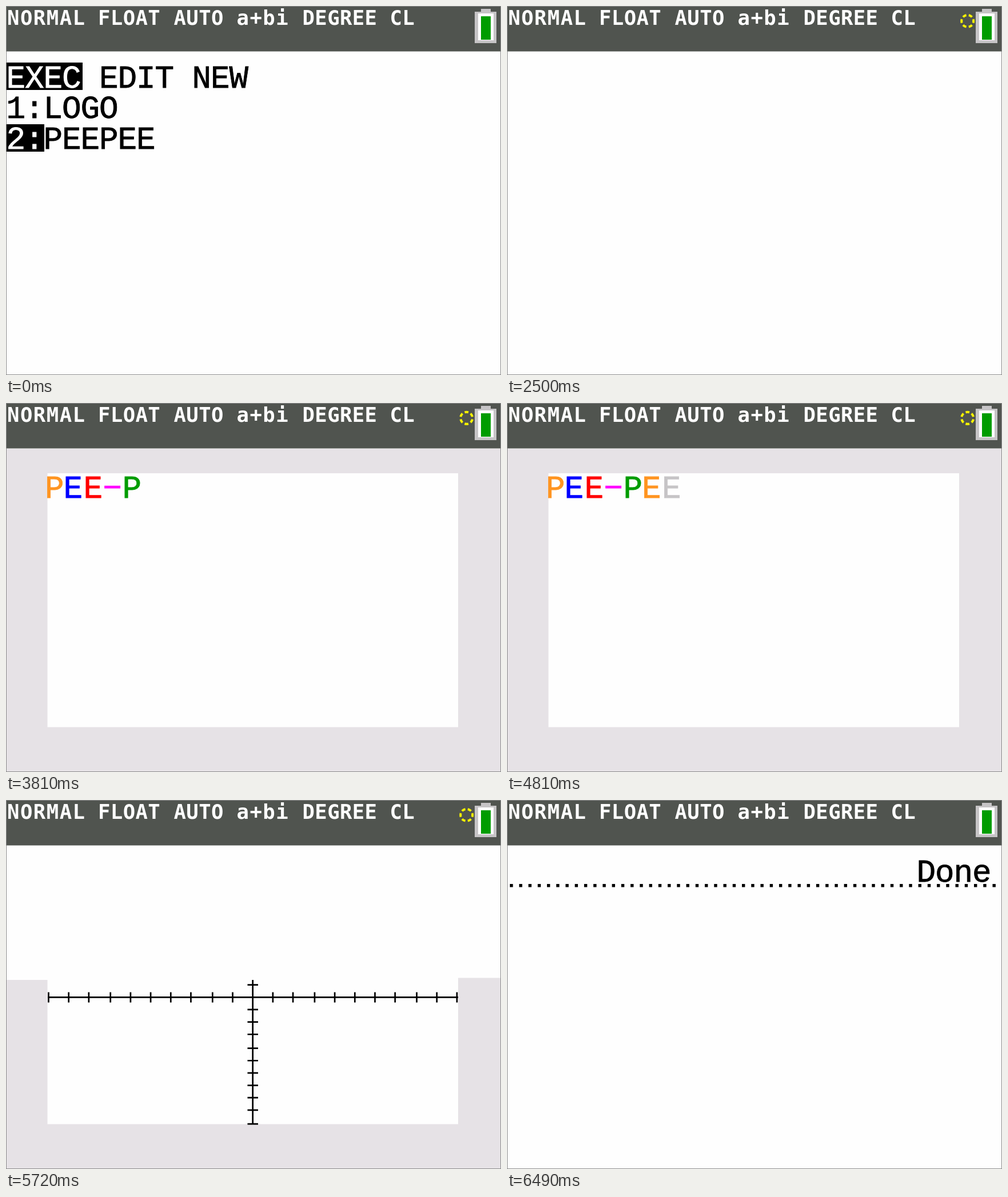
Write an HTML page that moves like this. It is 866 by 646 pixels and loops after 7.01 s.

```html
<!DOCTYPE html>
<html lang="en">
<head>
<meta charset="utf-8">
<title>Calculator program run</title>
<style>
  html, body { margin: 0; width: 100%; height: 100%; overflow: hidden; background: #fefefe; }
  svg { display: block; width: 866px; height: 646px; }
  .status { font: bold 35.6px "DejaVu Sans Mono", monospace; letter-spacing: .4px; fill: #fff; }
  .status .wide { letter-spacing: 1.5px; }
  .big { font: 56px "Liberation Mono", monospace; letter-spacing: -1.13px; }
  .big text { fill: currentColor; stroke: currentColor; stroke-width: .8; }
  .big .token { font: bold 39px "DejaVu Sans", sans-serif; stroke-width: 0; }
  .big .heavy { font-size: 53px; stroke-width: 2; }
  .inv { color: #fefefe; }
  .panel { fill: #e6e2e6; }
  .clear { fill: #fefefe; }
  .axis { fill: none; stroke: #000; stroke-width: 2.7; }
  [data-on] { visibility: hidden; }
</style>
</head>
<body>
<svg viewBox="0 0 866 646">
  <defs>
    <clipPath id="topBar"><rect x="130" y="120" width="45" height="15"/></clipPath>
  </defs>
  <rect class="clear" width="866" height="646"/>

  <!-- program menu -->
  <g class="big" data-on="0 620">
    <rect y="99" width="134" height="48"/>
    <rect y="207" width="67" height="48"/>
    <text class="inv" x=".5" y="142.5">EXEC</text>
    <text x="163" y="142.5">EDIT</text>
    <text x="325.5" y="142.5">NEW</text>
    <text x=".5" y="196">1:LOGO</text>
    <text class="inv" x=".5" y="250">2:</text>
    <text x="65.5" y="250">PEEPEE</text>
  </g>

  <!-- home screen command -->
  <g class="big" data-on="770 2500">
    <text class="token" x="2" y="135">p</text>
    <text class="heavy" x="34" y="142">r</text>
    <text class="token" x="68.5" y="135">g</text>
    <text class="heavy" x="102" y="142">m</text>
    <text x="130.5" y="142.5">PEEPEE</text>
  </g>
  <rect x="328" y="103" width="30" height="41" data-on="770 1230"/>
  <rect x="328" y="103" width="30" height="41" data-on="1880 2500"/>

  <!-- graph screen -->
  <g data-on="2840 5870">
    <path class="panel" d="M0 80H72.5V567.5H791V80H866V646H0Z"/>
  </g>
  <path class="clear" d="M72.5 635H500V632H791V646H72.5Z" data-on="2840 2930"/>
  <rect class="panel" x="72" y="80" width="720" height="43" data-on="3060 5720"/>
  <g id="letters" class="big"></g>
  <g class="axis">
    <path id="vertical" data-on="5450 5870"/>
    <path id="left" data-on="5540 5870"/>
    <path id="right" data-on="5720 5870"/>
  </g>
  <path class="clear" d="M0 80H866V311.5H520V315H0Z" data-on="5720 5870"/>

  <!-- result -->
  <g data-on="5990 7010">
    <g class="big"><text x="716.5" y="142.5">Done</text></g>
    <path d="M5 149.8H859" stroke="#000" stroke-width="5.4" stroke-dasharray="5.4 10.84"/>
  </g>
  <rect x="4" y="157" width="29" height="40" data-on="5990 6490"/>

  <!-- status bar -->
  <rect width="866" height="79.5" fill="#50544f"/>
  <g class="status">
    <text class="wide" x="2" y="33">NORMAL</text>
    <text x="161" y="33">FLOAT</text>
    <text x="293.5" y="33">AUTO</text>
    <text class="wide" x="403.5" y="33">a+bi</text>
    <text x="518.5" y="33">DEGREE</text>
    <text x="671.5" y="33">CL</text>
  </g>
  <g id="busy">
    <circle id="ring" cx="805.7" cy="26.3" r="10.5" fill="none" stroke="#f8f400" stroke-width="4"
      pathLength="60" stroke-dasharray="6 4" stroke-dashoffset="3"/>
  </g>
  <path d="M831 5H848V10H858V65H820V10H831Z" fill="#c6c4c6"/>
  <rect x="826" y="13" width="27" height="47" fill="#fff"/>
  <rect x="831" y="18" width="17" height="41" fill="#009c00"/>
  <rect x=".5" y=".5" width="865" height="645" fill="none" stroke="#8c8c8c"/>
</svg>
<script>
  const LOOP = 7010, PX = 866 / 320;
  const $ = id => document.getElementById(id);

  // [character, x, start, end, colour, clip]
  const letters = [
    ["P", 68, 3060, 5450, "#ff9420"],
    ["E", 100.5, 3230, 5450, "#0000ff"],
    ["E", 135.5, 3390, 3570, "#ff0000", "url(#topBar)"],
    ["E", 135.5, 3570, 5450, "#ff0000"],
    ["\u2212", 169.5, 3720, 5450, "#ff00ff"],
    ["P", 203.5, 3810, 5450, "#009c00"],
    ["E", 236, 3990, 5450, "#ff9420"],
    ["E", 271, 4170, 5450, "#c6c4c6"]
  ];
  for (const [char, x, start, end, color, clip] of letters) {
    const el = document.createElementNS("http://www.w3.org/2000/svg", "text");
    el.textContent = char;
    el.setAttribute("x", x);
    el.setAttribute("y", 166);
    el.style.color = color;
    if (clip) el.setAttribute("clip-path", clip);
    el.dataset.on = start + " " + end;
    $("letters").append(el);
  }

  // Axes with ticks snapped to the calculator's pixels.
  const cx = 431.7, cy = 345.3;
  const snap = v => Math.round(v) * PX;
  let left = `M73 ${cy}H${cx}`, right = `M${cx} ${cy}H791`, vertical = `M${cx} 123V567`;
  for (let k = 1; k <= 10; k++) {
    const dx = snap(13.2 * k), dy = snap(8.15 * k);
    left += `M${cx - dx} 336.5v18`;
    right += `M${cx + dx} 336.5v18`;
    vertical += `M422.5 ${cy - dy}h18.5M422.5 ${cy + dy}h18.5`;
  }
  $("left").setAttribute("d", left);
  $("right").setAttribute("d", right);
  $("vertical").setAttribute("d", vertical);

  const parts = [...document.querySelectorAll("[data-on]")].map(el => {
    const [start, end] = el.dataset.on.split(" ").map(Number);
    return { el, start, end };
  });

  // The ring turns a quarter of a dash at each of these times.
  const turns = [3390, 3570, 3720, 3810, 3990, 4350, 4440, 4810, 4990, 5270];
  const within = (t, a, b) => t >= a && t < b;
  const show = (el, on) => { el.style.visibility = on ? "visible" : "hidden"; };

  function draw(t) {
    for (const { el, start, end } of parts) show(el, within(t, start, end));
    show($("busy"), within(t, 620, 770) || within(t, 2500, 5990));
    const count = turns.filter(at => t >= at).length;
    const phase = count ? (count + 2) % 4 : 0;
    $("ring").setAttribute("transform", `rotate(${phase * 15} 805.7 26.3)`);
  }

  function tick() {
    draw(performance.now() % LOOP);
    requestAnimationFrame(tick);
  }
  tick();
</script>
</body>
</html>
```
